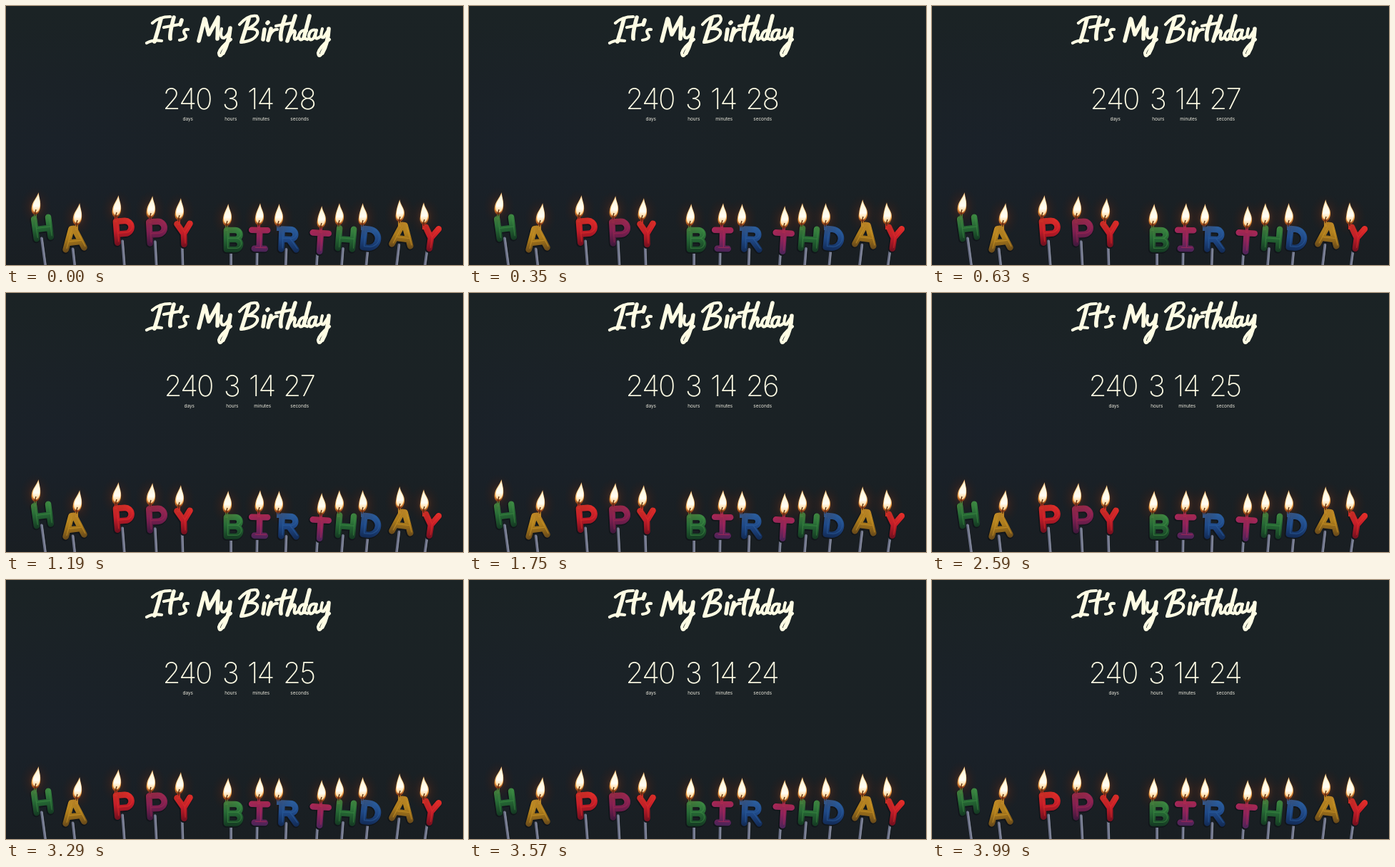
An HTML page for the animation above (4060 ms loop, 640 px wide and 364 px high).

```html
<!DOCTYPE html>
<html lang="en">
<head>
<meta charset="utf-8">
<title>It's My Birthday</title>
<style>
  html, body { margin: 0; width: 100%; height: 100%; overflow: hidden; background: #1b2225; }
  svg { display: block; width: 100%; height: 100%; }
  text { font-family: Inter, Lato, sans-serif; text-anchor: middle; fill: #fdfbe4; }
  .number { font-size: 40.5px; font-weight: 200; letter-spacing: -1.8px; }
  .label { font-size: 6.4px; font-weight: 400; fill: #eceade; }
  .brush, .wax { fill: none; stroke-linecap: round; stroke-linejoin: round; }
  .brush { stroke: #fffde4; }
</style>
</head>
<body>
<svg viewBox="0 0 640 364" preserveAspectRatio="none">
  <defs id="defs">
    <linearGradient id="night" x2="0" y2="1">
      <stop offset="0" stop-color="#1b2325"/>
      <stop offset=".65" stop-color="#1a2125"/>
      <stop offset="1" stop-color="#191e22"/>
    </linearGradient>
    <radialGradient id="haze" cx=".1" cy=".55" r=".5">
      <stop offset="0" stop-color="#1a2130" stop-opacity=".4"/>
      <stop offset="1" stop-color="#1a2130" stop-opacity="0"/>
    </radialGradient>
    <radialGradient id="halo">
      <stop offset="0" stop-color="#c45a18" stop-opacity=".42"/>
      <stop offset=".5" stop-color="#5a2412" stop-opacity=".2"/>
      <stop offset="1" stop-color="#30160e" stop-opacity="0"/>
    </radialGradient>
    <linearGradient id="fire" x2="0" y2="1">
      <stop offset="0" stop-color="#f3b468"/>
      <stop offset=".4" stop-color="#ffd694"/>
      <stop offset=".75" stop-color="#f09a3c"/>
      <stop offset="1" stop-color="#7a2d12"/>
    </linearGradient>
    <linearGradient id="core" x2="0" y2="1">
      <stop offset="0" stop-color="#fff3d4"/>
      <stop offset=".65" stop-color="#fffdf4"/>
      <stop offset="1" stop-color="#ffcf86"/>
    </linearGradient>
  </defs>
  <rect width="640" height="364" fill="url(#night)"/>
  <rect width="640" height="364" fill="url(#haze)"/>
  <g id="candles"></g>
  <g class="brush" role="img" aria-label="It's My Birthday">
    <g stroke-width="5.6">
      <path d="M217 18Q213 34 208 50M235 16Q229 38 230 46M246 20L244 26"/>
      <path d="M278 18L270 49M279 19L284 40L297 16L296 46M314 31Q312 52 304 66"/>
      <path d="M340 18L330 50M362 33L360 47M366 24l1-1M371 32L367 48M391 15Q383 38 385 47"/>
      <path d="M405 14L394 49M425 14L417 45M452 32Q451 52 443 66"/>
    </g>
    <g stroke-width="4.2">
      <path d="M205 24Q214 15 230 15M197 52Q206 47 218 49M221 30L242 26M255 33Q247 32 250 39Q256 46 243 48"/>
      <path d="M302 32Q299 45 305 45Q311 42 314 32M304 66Q299 74 298 66Q300 58 315 47"/>
      <path d="M327 26Q339 12 351 14Q358 22 339 32Q354 31 352 39Q348 49 329 51"/>
      <path d="M369 42Q374 32 380 33M378 28L399 24M396 44Q404 30 405 37Q401 52 409 44"/>
      <path d="M421 35Q413 32 410 42Q411 51 417 45L422 47M434 34Q426 32 424 42Q425 51 431 45L435 34Q430 51 440 43"/>
      <path d="M443 32Q439 46 445 44L452 33M443 66Q438 74 437 66Q439 58 453 47"/>
    </g>
  </g>
  <g id="clock"></g>
</svg>
<script>
const LOOP = 4060;
const TICK = 980;

const COLORS = { // top, middle, bottom
  green: ['#3f8f45', '#256634', '#143822'],
  gold: ['#d09a2a', '#a9791b', '#66481a'],
  red: ['#e4302a', '#c01c28', '#74101f'],
  plum: ['#a02a52', '#7e1f50', '#44193e'],
  pink: ['#b82a5c', '#86235a', '#4b2458'],
  blue: ['#2c5f9e', '#1f4886', '#122a54']
};

const GLYPHS = {
  H: 'M-10-14V14M10-14V14M-10 1H10',
  A: 'M-13 14L-2-14H2L13 14M-8 5H8',
  P: 'M-10 16V-14H2a9 9 0 0 1 0 18H-10',
  Y: 'M-9-14L0 0L9-14M0 0V15',
  B: 'M-9-13V14H3a7 7 0 0 0 0-14H-9M3 0a6 6 0 0 0 0-13H-9',
  I: 'M-11-12H11M0-12V14M-7 14H8',
  R: 'M-10 14V-14H2a7 7 0 0 1 0 14H-10M0 0L11 14',
  T: 'M-11-12H11M0-12V14',
  D: 'M-10-13V13H-3a13 13 0 0 0 0-26Z'
};

// glyph, color, centre x, centre y, flame offset
const CANDLES = [
  ['H', 'green', 51, 312, -9], ['A', 'gold', 95, 327, 5], ['P', 'red', 165, 316, -10],
  ['P', 'plum', 211, 317, -8], ['Y', 'red', 249, 320, -6],
  ['B', 'green', 318, 328, -8], ['I', 'pink', 355, 327, 0], ['R', 'blue', 396, 328, -14],
  ['T', 'pink', 440, 331, 2], ['H', 'green', 476, 327, -9], ['D', 'blue', 511, 327, -11],
  ['A', 'gold', 555, 322, -3], ['Y', 'red', 595, 326, -9]
];

const byId = id => document.getElementById(id);

function add(parent, tag, attrs, text) {
  const node = document.createElementNS('http://www.w3.org/2000/svg', tag);
  for (const key in attrs) node.setAttribute(key, attrs[key]);
  if (text !== undefined) node.textContent = text;
  return parent.appendChild(node);
}

for (const [id, shades] of Object.entries(COLORS)) {
  const gradient = add(byId('defs'), 'linearGradient', {
    id, gradientUnits: 'userSpaceOnUse', x1: 0, y1: -18, x2: 0, y2: 18
  });
  shades.forEach((shade, i) => add(gradient, 'stop', { offset: i / 2, 'stop-color': shade }));
}

const flamePath = lean =>
  `M${lean} 0C${lean + 1} 8 7 13 6 21C5 28 2 31-1 31C-6 31-7 25-6 20C-5 13 ${lean - 3} 8 ${lean} 0Z`;

function drawFlame(parent, x, y, lean) {
  add(parent, 'ellipse', { cx: x, cy: y + 20, rx: 22, ry: 28, fill: 'url(#halo)' });
  const flame = add(parent, 'g', { transform: `translate(${x} ${y})` });
  const d = flamePath(lean);
  add(flame, 'path', { d, fill: 'url(#fire)' });
  add(flame, 'path', { d, fill: 'url(#core)', transform: `translate(${lean * .15} 2) scale(.82 .84)` });
  add(flame, 'path', { d: 'M-1 33Q-2 28 0 24', fill: 'none', stroke: '#5a2a14', 'stroke-width': 1.4 });
}

// The row fans out: candles tilt away from the middle, flames bend less towards the right.
function drawCandle([glyph, color, x, y, flameOffset]) {
  const d = GLYPHS[glyph];
  const group = add(byId('candles'), 'g', {});
  const letter = add(group, 'g', {
    class: 'wax', transform: `translate(${x} ${y}) rotate(${(x - 320) / 35})`
  });
  const stroke = (path, paint, width, shift = 0) => add(letter, 'path', {
    d: path, stroke: paint, 'stroke-width': width, transform: `translate(${shift} ${-shift})`
  });
  stroke('M-3 14V60', '#6c7188', 3.6);
  stroke('M-2 14V60', '#9297a8', 1);
  stroke(d, '#11151a', 10.5, -.8);
  stroke(d, `url(#${color})`, 8.6);
  stroke(d, COLORS[color][0], 1.2, 1.6).setAttribute('stroke-opacity', .6);

  const flameX = x + flameOffset;
  const tipY = y - 50;
  add(group, 'path', { d: `M${flameX - 1} ${tipY + 38}v-9`, stroke: COLORS[color][0], 'stroke-width': 4 });
  drawFlame(group, flameX, tipY, 4 - x / 120);
}

CANDLES.forEach(drawCandle);

const others = add(byId('clock'), 'g', {});

function addColumn(parent, value, label, x) {
  add(parent, 'text', { class: 'label', x, y: 161 }, label);
  return add(parent, 'text', { class: 'number', x: x - 1, y: 144.7 }, value);
}

addColumn(others, 240, 'days', 254.7);
addColumn(others, 3, 'hours', 314.8);
addColumn(others, 14, 'minutes', 357.2);
const secondsText = addColumn(byId('clock'), 28, 'seconds', 411.2);

function render(time) {
  const seconds = 28 - Math.floor((time % LOOP + TICK / 2) / TICK);
  secondsText.textContent = seconds;
  // A 7 is narrower, so the centred row closes up.
  others.setAttribute('transform', `translate(${seconds % 10 === 7 ? 2 : 0} 0)`);
}

const begin = performance.now();
function frame() {
  render(performance.now() - begin);
  requestAnimationFrame(frame);
}
frame();
</script>
</body>
</html>
```
